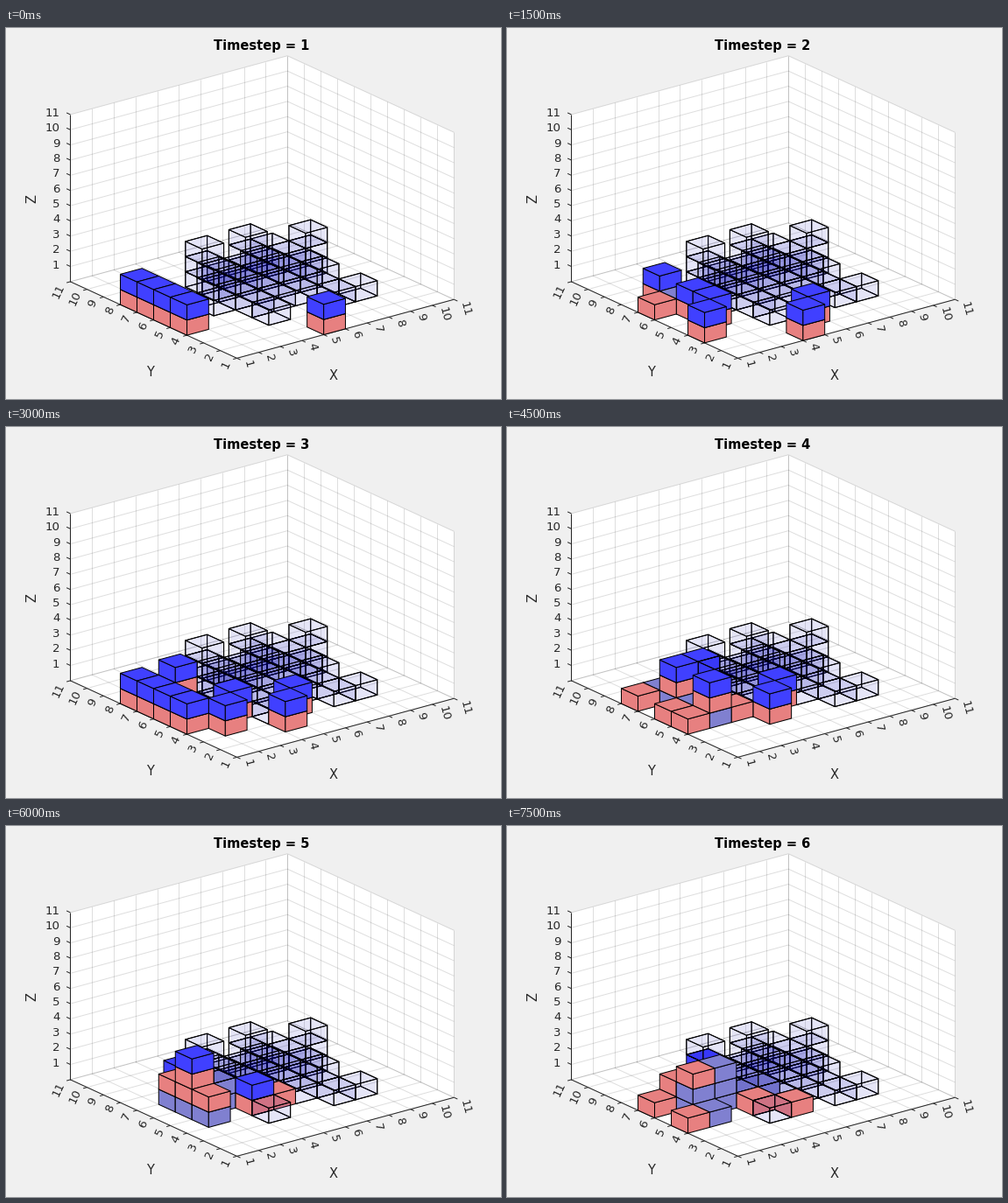
Animation, 565 px wide and 424 px high, one loop 8 s. Source, as a matplotlib script:

```python
import math

import matplotlib.pyplot as plt
from matplotlib.animation import FuncAnimation
from matplotlib.collections import LineCollection, PolyCollection

W, H, DPI = 565, 424, 100
PX = 72 / DPI  # points per pixel
STEP_MS, TICK_MS, LOOP_MS = 1500, 500, 8000

# Orthographic view stretched to fill the plot box (azimuth -37.5, elevation 30)
AZ, EL = math.radians(37.5), math.radians(30)
C, S = math.cos(AZ), math.sin(AZ)
SX = 0.775 * W / (C + S)
SY = 0.815 * H / (math.sin(EL) * (C + S) + math.cos(EL))
OX, OY = 0.13 * W + S * SX, 0.89 * H


def project(a, b, z):
    """Grid corner (0..10, 0..10, 0..11) to stage pixels."""
    a, b, z = a / 10, b / 10, z / 11
    up = math.sin(EL) * (a * S + b * C) + math.cos(EL) * z
    return OX + SX * (a * C - b * S), OY - SY * up


COLORS = {
    "r": (0.906, 0.502, 0.502, 1),
    "b": (0.25, 0.25, 1, 1),
    "p": (0.502, 0.502, 0.815, 1),
    "g": (0, 0, 0.7, 0.05),
}

# Each column is (a, b, kinds from the floor upwards)
ROW = [(0, b, "rb") for b in range(3, 7)]
STEPS = [
    ROW + [(4, 0, "rb")],
    [(1, 6, "rb"), (0, 5, "r"), (1, 5, "p"), (1, 4, "rb"), (1, 3, "rb"),
     (0, 2, "rb"), (3, 0, "rb"), (4, 1, "rb")],
    ROW + [(1, 5, "prb"), (1, 2, "rb"), (2, 3, "rb"), (3, 1, "rb"),
           (4, 2, "rb")],
    [(0, 6, "r"), (1, 6, "p"), (0, 4, "r"), (0, 3, "r"), (1, 5, "prb"),
     (2, 5, "prb"), (1, 4, "p"), (1, 3, "prb"), (2, 3, "r"), (3, 2, "rb"),
     (4, 3, "rb")],
    [(1, 5, "pr"), (1, 4, "prrb"), (1, 3, "pr"), (2, 4, "pp"), (2, 6, "rb"),
     (3, 3, "rb"), (4, 3, "r")],
    [(0, 5, "r"), (0, 3, "r"), (1, 3, "p"), (1, 5, "pr"), (1, 4, "ppr"),
     (2, 4, "ppp"), (3, 6, "rb"), (3, 3, "r"), (4, 2, "r"), (3, 4, "p"),
     (4, 4, "p")],
]

GOAL = [(a, b, "gg" if b in (4, 5) else "g")
        for a in range(3, 6) for b in range(3, 7)]
GOAL += [(6, b, "gg") for b in range(3, 7)]
GOAL += [(3, 2, "g"), (6, 2, "g"), (7, 2, "g")]
GOAL += [(a, b, "ggg") for a, b in ((2, 4), (4, 4), (3, 6), (5, 6), (7, 5))]


def fill(columns):
    return {(a, b, z): k for a, b, kinds in columns
            for z, k in enumerate(kinds)}


def faces(a, b, z, see_through):
    def quad(*corners):
        return [project(a + i, b + j, z + k) for i, j, k in corners]

    near = [
        quad((0, 0, 0), (0, 1, 0), (0, 1, 1), (0, 0, 1)),
        quad((0, 0, 0), (1, 0, 0), (1, 0, 1), (0, 0, 1)),
        quad((0, 0, 1), (1, 0, 1), (1, 1, 1), (0, 1, 1)),
    ]
    if not see_through:
        return near
    far = [
        quad((0, 0, 0), (1, 0, 0), (1, 1, 0), (0, 1, 0)),
        quad((1, 0, 0), (1, 1, 0), (1, 1, 1), (1, 0, 1)),
        quad((0, 1, 0), (1, 1, 0), (1, 1, 1), (0, 1, 1)),
    ]
    return far + near


def scene(columns):
    """All faces from back to front, with their colours."""
    cells = {**fill(GOAL), **fill(columns)}
    polys, colors = [], []
    for a, b, z in sorted(cells, key=lambda c: (-c[0], -c[1], c[2])):
        kind = cells[a, b, z]
        new = faces(a, b, z, kind == "g")
        polys += new
        colors += [COLORS[kind]] * len(new)
    return polys, colors


plt.rcParams["font.family"] = "DejaVu Sans"
INK = "#262626"
fig = plt.figure(figsize=(W / DPI, H / DPI), dpi=DPI, facecolor="#f0f0f0")
ax = fig.add_axes([0, 0, 1, 1])
ax.set_xlim(0, W)
ax.set_ylim(H, 0)
ax.axis("off")


def label(x, y, text, size=13.33, **kw):
    kw = {"ha": "center", "va": "center", "color": INK, **kw}
    return ax.text(x, y, text, fontsize=size * PX, **kw)


def segment(p, q):
    return [project(*p), project(*q)]


def draw_axes():
    outline = [(0, 0, 0), (10, 0, 0), (10, 0, 11), (10, 10, 11),
               (0, 10, 11), (0, 10, 0)]
    ax.add_collection(PolyCollection([[project(*p) for p in outline]],
                                     facecolors="white"))
    grid = []
    for i in range(11):
        grid += [segment((i, 0, 0), (i, 10, 0)),
                 segment((0, i, 0), (10, i, 0)),
                 segment((i, 10, 0), (i, 10, 11)),
                 segment((10, i, 0), (10, i, 11))]
    for z in range(12):
        grid += [segment((0, 10, z), (10, 10, z)),
                 segment((10, 0, z), (10, 10, z))]
    ax.add_collection(LineCollection(grid, colors=(0.15, 0.15, 0.15, 0.15),
                                     linewidths=PX))

    lines = [segment((0, 0, 0), (10, 0, 0)), segment((0, 0, 0), (0, 10, 0)),
             segment((0, 10, 0), (0, 10, 11))]

    def tick(x, y, dx, dy):
        lines.append([(x, y), (x + dx, y + dy)])

    for i in range(11):
        name = str(i + 1)
        extra = 4 * (len(name) - 1)
        x, y = project(i, 0, 0)
        tick(x, y, 4, 1.8)
        label(x + 12.2 + 0.26 * extra, y + 6.8 + 0.97 * extra, name,
              rotation=-75)
        x, y = project(0, i, 0)
        tick(x, y, -4.3, 1.2)
        label(x - 12.2 - 0.42 * extra, y + 7 + 0.91 * extra, name,
              rotation=65)
        x, y = project(0, 10, i + 1)
        tick(x, y, -4.3, -2)
        label(61.5, y + 2, name, ha="right", va="baseline")
    ax.add_collection(LineCollection(lines, colors=INK, linewidths=PX))

    label(374, 397, "X", 14.67)
    label(164.5, 394, "Y", 14.67)
    label(30, 194.5, "Z", 14.67, rotation=90)


draw_axes()
title = label(W * 0.5165, 25, "", 14.67, va="baseline", weight="bold",
              color="black")
cubes = PolyCollection([], edgecolors="black", linewidths=PX, zorder=3)
ax.add_collection(cubes, autolim=False)
SCENES = [scene(columns) for columns in STEPS]


def update(n):
    step = n * TICK_MS // STEP_MS
    polys, colors = SCENES[step]
    cubes.set_verts(polys)
    cubes.set_facecolor(colors)
    title.set_text(f"Timestep = {step + 1}")
    return cubes, title


anim = FuncAnimation(fig, update, frames=LOOP_MS // TICK_MS,
                     interval=TICK_MS, init_func=lambda: update(0),
                     repeat=True, repeat_delay=0, blit=False)
plt.show()
```
